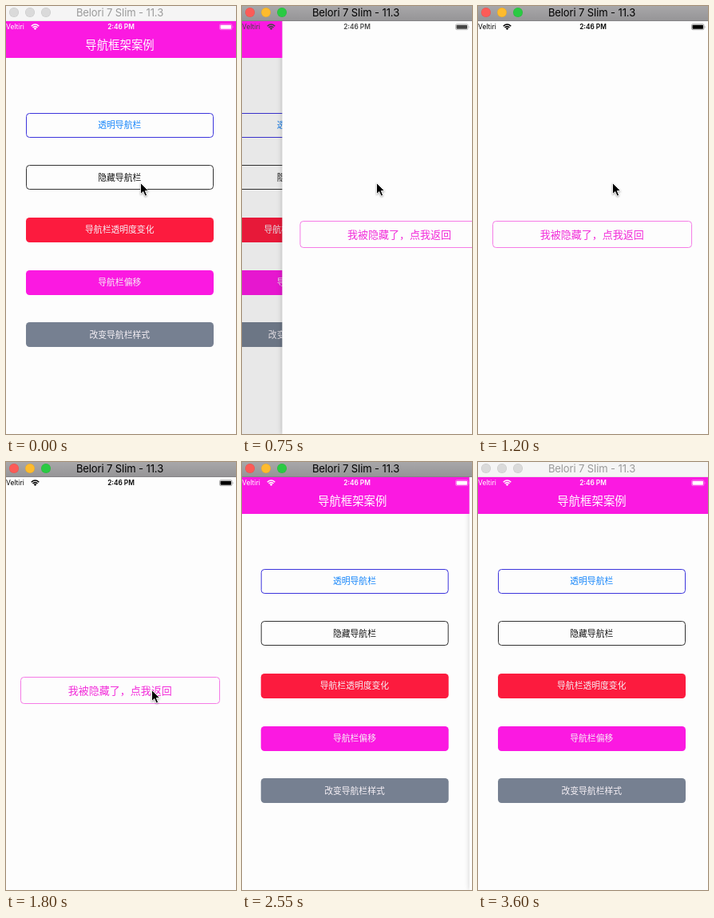
Animation, 288 px wide and 536 px high, one loop 3.7 s. Source, as an HTML page:

```html
<!DOCTYPE html>
<html lang="zh-CN">
<head>
<meta charset="utf-8">
<title>导航框架案例</title>
<style>
  html, body { margin: 0; width: 100%; height: 100%; overflow: hidden; background: #fdfdfd; }
  body { font-family: "Noto Sans CJK SC", "Noto Sans CJK", sans-serif; }
  #stage { position: relative; width: 288px; height: 536px; overflow: hidden; }
  #stage > * { position: absolute; }

  .page { left: -4px; top: 19px; width: 293px; height: 517px; background: #fdfdfd; }
  #detail { box-shadow: 0 0 6px rgba(0, 0, 0, .22); }
  #dim { left: 0; top: 19px; width: 288px; height: 517px; background: #000; }

  .btn {
    position: absolute; left: 29px; width: 234.5px; height: 31px;
    box-sizing: border-box; border: 1px solid; border-radius: 4.5px;
    display: flex; align-items: center; justify-content: center;
    padding-bottom: 1px; font-size: 10.8px; line-height: 1; white-space: nowrap;
  }
  .btn.fill { border: 0; color: #f6f0f6; }
  .btn span { color: var(--ink, inherit); }
  #back { left: 22px; top: 249.5px; width: 249.5px; height: 34.5px; font-size: 13px; color: #f57be6; --ink: #f22bd9; }

  #nav {
    left: -4px; top: 19px; width: 293px; height: 45.5px; background: #fb19e1;
    color: #fff; font-size: 14.4px; line-height: 58px; text-align: center;
  }

  #status { left: 0; top: 19px; width: 288px; height: 15px; font-family: Inter, sans-serif; line-height: 15px; }
  #status > * { position: absolute; top: 0; }
  #network { left: 0; font-size: 8.5px; }
  #clock { left: 94px; width: 100px; text-align: center; font-size: 8.3px; font-weight: 600; }

  #bar {
    left: 0; top: 0; width: 288px; height: 19px; box-sizing: border-box;
    background: #f5f5f5; border-bottom: 1px solid #e6e6e6; color: #9a9a9a;
    font: 13px/17px Inter, sans-serif; letter-spacing: -.1px;
  }
  #bar b { position: absolute; left: 0; width: 285px; text-align: center; font-weight: 400; }
  #bar i {
    position: absolute; top: 1.7px; width: 12.4px; height: 12.4px; border-radius: 50%;
    background: #dadada; box-shadow: inset 0 0 0 .5px rgba(0, 0, 0, .1);
  }
  #bar.active { background: linear-gradient(#a8a7a9, #969597); border-color: #858486; color: #000; }
  #bar.active i { background: var(--c); }
  #cursor { left: 0; top: 0; overflow: visible; filter: drop-shadow(0 1px 1px rgba(0, 0, 0, .35)); }
</style>
</head>
<body>
<div id="stage">
  <div id="home" class="page">
    <div class="btn" style="top:114.5px;color:#3d35dc;--ink:#1585fa"><span>透明导航栏</span></div>
    <div class="btn" style="top:180.2px;color:#333;--ink:#111"><span>隐藏导航栏</span></div>
    <div class="btn fill" style="top:245.9px;background:#fc1b3e"><span>导航栏透明度变化</span></div>
    <div class="btn fill" style="top:311.6px;background:#fb19e1"><span>导航栏偏移</span></div>
    <div class="btn fill" style="top:377.3px;background:#768091"><span>改变导航栏样式</span></div>
  </div>
  <div id="dim"></div>
  <div id="detail" class="page">
    <div class="btn" id="back"><span>我被隐藏了，点我返回</span></div>
  </div>
  <div id="nav">导航框架案例</div>
  <div id="status">
    <span id="network">Veltiri</span>
    <svg style="left:31px;top:3px" width="11" height="9" fill="none" stroke="currentColor" stroke-width="1.5">
      <path d="M.7 3.2Q5.5-1.2 10.3 3.2M2.5 5Q5.5 2.3 8.5 5"/>
      <path d="M3.6 6.1Q5.5 4.6 7.4 6.1L5.5 8.1Z" fill="currentColor" stroke="none"/>
    </svg>
    <span id="clock">2:46 PM</span>
    <svg style="left:267px;top:3px" width="19" height="9" fill="currentColor">
      <rect x=".5" y=".7" width="15.5" height="7" rx="1.6" fill="none" stroke="currentColor" stroke-width=".6" opacity=".55"/>
      <rect x="1.5" y="1.7" width="13.5" height="5" rx=".8"/>
      <path d="M16.8 3Q18.2 4.2 16.8 5.4Z" opacity=".6"/>
    </svg>
  </div>
  <div id="bar">
    <i style="left:3.8px;--c:#fc5b57"></i>
    <i style="left:23.8px;--c:#fdbb2e"></i>
    <i style="left:43.8px;--c:#2aca43"></i>
    <b>Belori 7 Slim - 11.3</b>
  </div>
  <svg id="cursor" width="12" height="19">
    <path d="M.5.5V14.6L3.8 11.5 6.2 17 8.6 16 6.3 10.6H10.6Z" fill="#000" stroke="#fff" stroke-width=".9"/>
  </svg>
</div>
<script>
  const LOOP = 3700, TICK = 150, WIDTH = 293;
  const PUSH = 568, POP = 2186;
  const $ = id => document.getElementById(id);
  const [home, dim, detail, nav, status, bar, cursor] =
    ["home", "dim", "detail", "nav", "status", "bar", "cursor"].map($);

  // start time, x, y; no position means hidden
  const cursorPath = [
    [0, 168, 221], [1500, 168, 224], [1650, 182, 281], [1800, 182, 285],
    [2400], [3000, 282, 531], [3150]
  ];

  // Critically damped spring: 1 at the start, settling to 0
  const spring = t => {
    const k = Math.max(0, t) * 0.017;
    return (1 + k) * Math.exp(-k);
  };
  const shift = (el, x, y = 0) => el.style.transform = `translate(${x}px, ${y}px)`;

  function draw(t) {
    const popping = t >= POP;
    const open = popping ? spring(t - POP) : 1 - spring(t - PUSH);
    const moved = open * WIDTH;

    shift(home, -0.3 * moved);
    shift(nav, -moved);
    shift(detail, WIDTH - moved);
    detail.style.visibility = moved > 0.5 ? "visible" : "hidden";
    dim.style.opacity = 0.1 * open;

    const dark = popping ? 0 : Math.min(1, Math.max(0, (t - PUSH) / 250));
    const tone = Math.round(255 * (1 - dark));
    $("status").style.color = `rgb(${tone}, ${tone}, ${tone})`;

    bar.className = t >= 600 && t < 3600 ? "active" : "";

    const [, x, y] = cursorPath.filter(p => p[0] <= t).pop();
    cursor.style.visibility = x === undefined ? "hidden" : "visible";
    if (x !== undefined) shift(cursor, x, y);
  }

  // The screen refreshes once per tick
  function loop() {
    const t = performance.now() % LOOP;
    draw(Math.floor(t / TICK) * TICK);
    requestAnimationFrame(loop);
  }
  loop();
</script>
</body>
</html>
```
